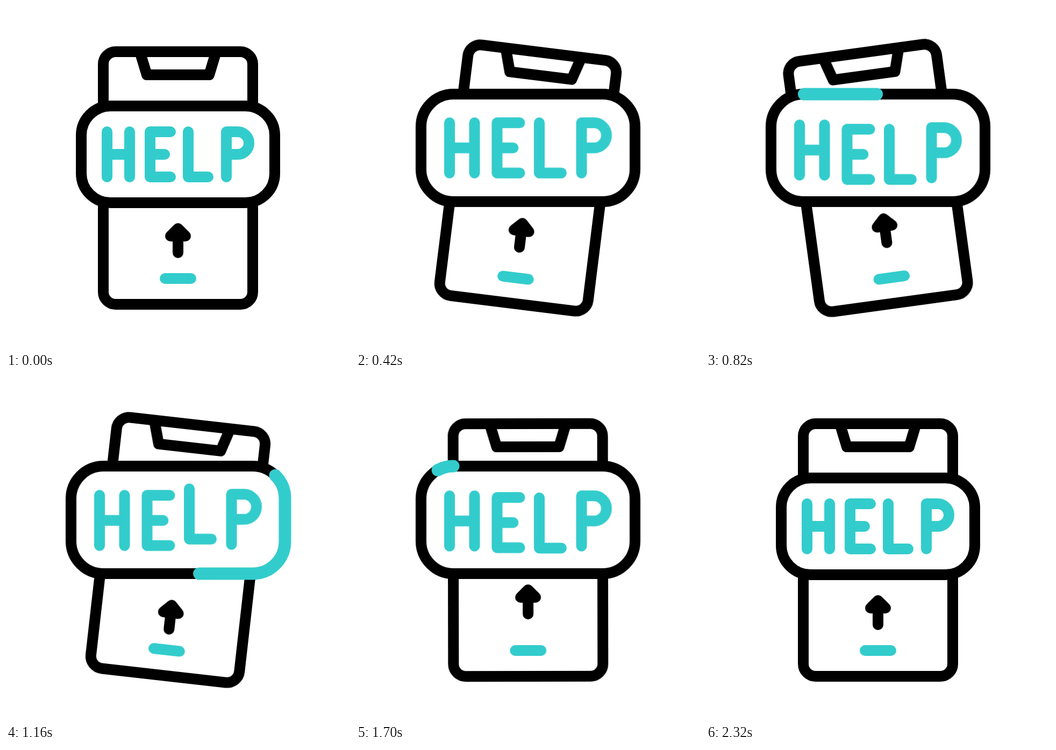
These frames come from a looping animation (640x640 px, 2400 ms). An HTML page without scripts:

```html
<!DOCTYPE html>
<html lang="en">
<head>
<meta charset="utf-8">
<title>Help button on a phone</title>
<style>
  @property --head { syntax: "<length>"; inherits: false; initial-value: 0px; }
  @property --tail { syntax: "<length>"; inherits: false; initial-value: 0px; }

  html, body { margin: 0; width: 100%; height: 100%; overflow: hidden; background: #fff; }
  svg { display: block; width: 100%; height: 100%; }

  svg * {
    animation-duration: 2400ms;
    animation-iteration-count: infinite;
    animation-timing-function: cubic-bezier(.333, 0, .667, 1);
  }
  .line { fill: none; stroke: #000; stroke-width: 20; stroke-linecap: round; stroke-linejoin: round; }
  .teal { stroke: #3cc; }
  .solid { fill: #000; }

  .phone { transform-origin: 320px 320px; animation-name: shake; }
  .arrow { animation-name: nudge; }
  .panel { transform-origin: 320px 276px; animation-name: grow; }
  .panel * { vector-effect: non-scaling-stroke; }
  .panel rect { fill: #fff; }
  .panel path { animation-name: bob; }
  .runner {
    stroke-width: 23;
    stroke-dasharray: calc(var(--head) - var(--tail)) 200px;
    stroke-dashoffset: calc(0px - var(--tail));
    animation-name: head, tail, show;
  }

  @keyframes shake {
    0%, 8.33%, 71.67%, 100% { transform: rotate(0deg); }
    20%, 45.83% { transform: rotate(8deg); }
    33.33%, 59.17% { transform: rotate(-8deg); }
  }
  @keyframes nudge {
    0%, 5.83%, 92.5%, 100% { transform: translateY(0); }
    30.83%, 70% { transform: translateY(-20px); }
    50% { transform: translateY(10px); }
  }
  @keyframes grow {
    0%, 4.17%, 96.67%, 100% { transform: translateY(0) scale(1, 1); }
    17.08%, 83.33% { transform: translateY(-12px) scale(1.106, 1.111); }
  }
  /* each letter sets its own three heights */
  @keyframes bob {
    0%, 18%, 80%, 100% { transform: translateY(0); }
    34.17% { transform: translateY(var(--a)); }
    48.33% { transform: translateY(var(--b)); }
    61.67% { transform: translateY(var(--c)); }
  }
  @keyframes head {
    0%, 25% { --head: 0px; }
    66.67%, 100% { --head: 100px; }
  }
  @keyframes tail {
    0%, 33.33% { --tail: 0px; }
    75%, 100% { --tail: 100px; }
  }
  @keyframes show {
    0%, 25%, 75%, 100% { visibility: hidden; animation-timing-function: step-end; }
    25.1%, 74.9% { visibility: visible; }
  }
</style>
</head>
<body>
<svg viewBox="0 0 640 640" role="img" aria-label="HELP">
  <g class="phone">
    <rect class="line" x="181" y="85" width="278" height="470" rx="23"/>
    <path class="line" d="M249 85 L262 128 H378 L391 85"/>
    <path class="line solid arrow" d="M320 459 V428 H306 L320 414 L334 428 H320"/>
    <path class="line teal" d="M296 507 H344"/>
  </g>
  <g class="panel">
    <rect class="line" x="140" y="186" width="360" height="180" rx="54.5"/>
    <path class="line teal" style="--a:3.6px; --b:.9px; --c:3.6px" d="M188 234 V318 M230 234 V318 M188 276 H230"/>
    <path class="line teal" style="--a:10.8px; --b:.9px; --c:9px" d="M306 234 H268 V318 H306 M268 276 H295"/>
    <path class="line teal" style="--a:10.8px; --b:-9.9px; --c:10.4px" d="M339 234 V318 H376"/>
    <path class="line teal" style="--a:8.1px; --b:-.9px; --c:3.6px" d="M410 318 V234 H431 a21 21 0 0 1 0 42 H410"/>
  </g>
  <rect class="line teal runner" x="121" y="164" width="398" height="200" rx="60" pathLength="100"/>
</svg>
</body>
</html>
```
